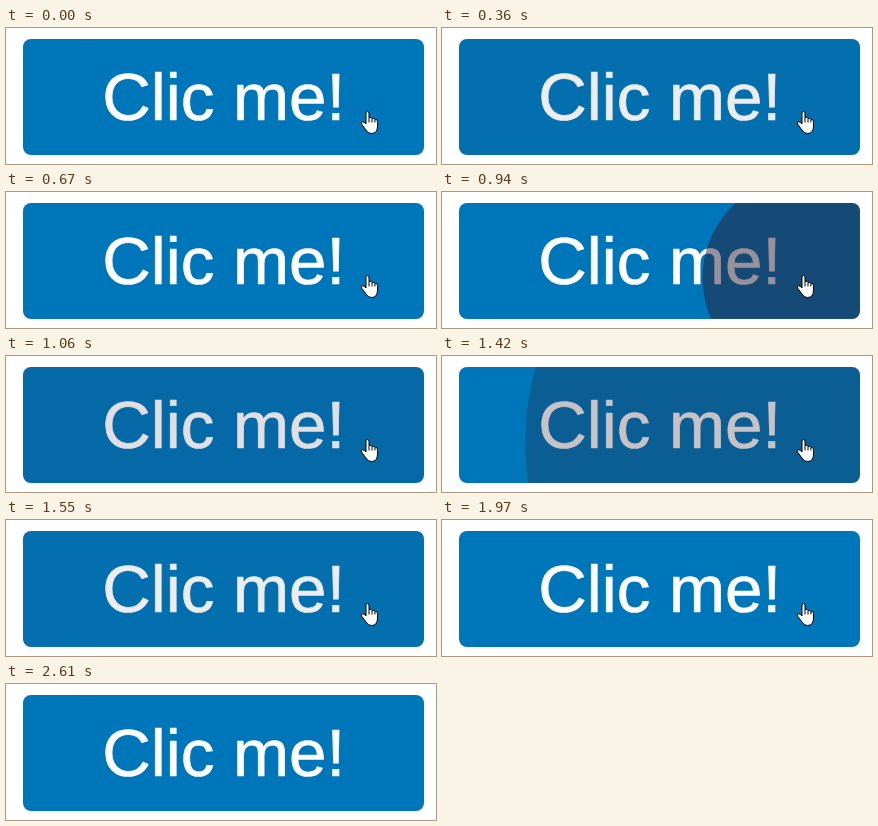
Animation of 430 by 136 pixels, one loop 2.88 s. Source, as an HTML page:

```html
<!DOCTYPE html>
<html lang="en">
<head>
<meta charset="utf-8">
<title>Ripple button</title>
<style>
  html, body { margin: 0; height: 100%; overflow: hidden; background: #fff; }
  svg { display: block; }
  text {
    font: 67.3px "Liberation Sans", Arial, sans-serif;
    fill: #fff; stroke: #fff; stroke-width: 0.7px;
  }
</style>
</head>
<body>
<svg width="430" height="136" viewBox="0 0 430 136">
  <clipPath id="shape"><rect x="17" y="11" width="401" height="116" rx="8"/></clipPath>
  <g clip-path="url(#shape)">
    <rect width="430" height="136" fill="#0076ba"/>
    <text x="217.7" y="92" text-anchor="middle">Clic me!</text>
    <circle id="ripple" cx="362" cy="86" r="0" fill="#2b1a2b"/>
  </g>
  <g id="hand" fill="#fff" stroke="#000" stroke-linejoin="round">
    <path d="M5.5 14V3Q5.5 1.5 7 1.5T8.5 3V7.5Q11.2 6.8 11.5 8.5Q14 7.8 14.4 9.5Q17 9 17 11.5V16Q17 23.5 11 23.5Q7.5 23.5 5.5 20L1 14Q.3 11.8 2.2 11.8Q3.8 12 5.5 14Z"/>
    <path d="M8.5 7.5V12.5M11.5 8.5V12.5M14.4 9.5V12.5" fill="none"/>
  </g>
</svg>
<script>
const LOOP = 2880, STEP = 30, DECAY = 97, RADIUS = 500, OPACITY = 0.6;

// Each ripple is visible from `from` to `until` and stops moving at `hold`.
const clicks = [
  { start: 165, from: 180, until: 670, hold: 670 },
  { start: 918, from: 940, until: 1390, hold: 1060 },
  { start: 1341, from: 1390, until: 1790, hold: 1790 }
];

const ripple = document.getElementById("ripple");
const hand = document.getElementById("hand");

// Decelerating growth from 0 towards 1
function progress(t) {
  const click = clicks.find(c => t >= c.from && t < c.until);
  if (!click) return 1;
  const { start, from, hold } = click;
  const shown = from + Math.floor((Math.min(t, hold) - from) / STEP) * STEP;
  return 1 - Math.exp((start - shown) / DECAY);
}

function draw(now) {
  const t = now % LOOP;
  const p = progress(t);
  ripple.setAttribute("r", RADIUS * p);
  ripple.setAttribute("opacity", OPACITY * (1 - p));
  hand.setAttribute("transform", `translate(354.5 ${t < 2360 ? 82 : 84})`);
  hand.setAttribute("visibility", t < 2610 ? "visible" : "hidden");
}

const begin = performance.now();
function tick() {
  draw(performance.now() - begin);
  requestAnimationFrame(tick);
}
tick();
</script>
</body>
</html>
```
